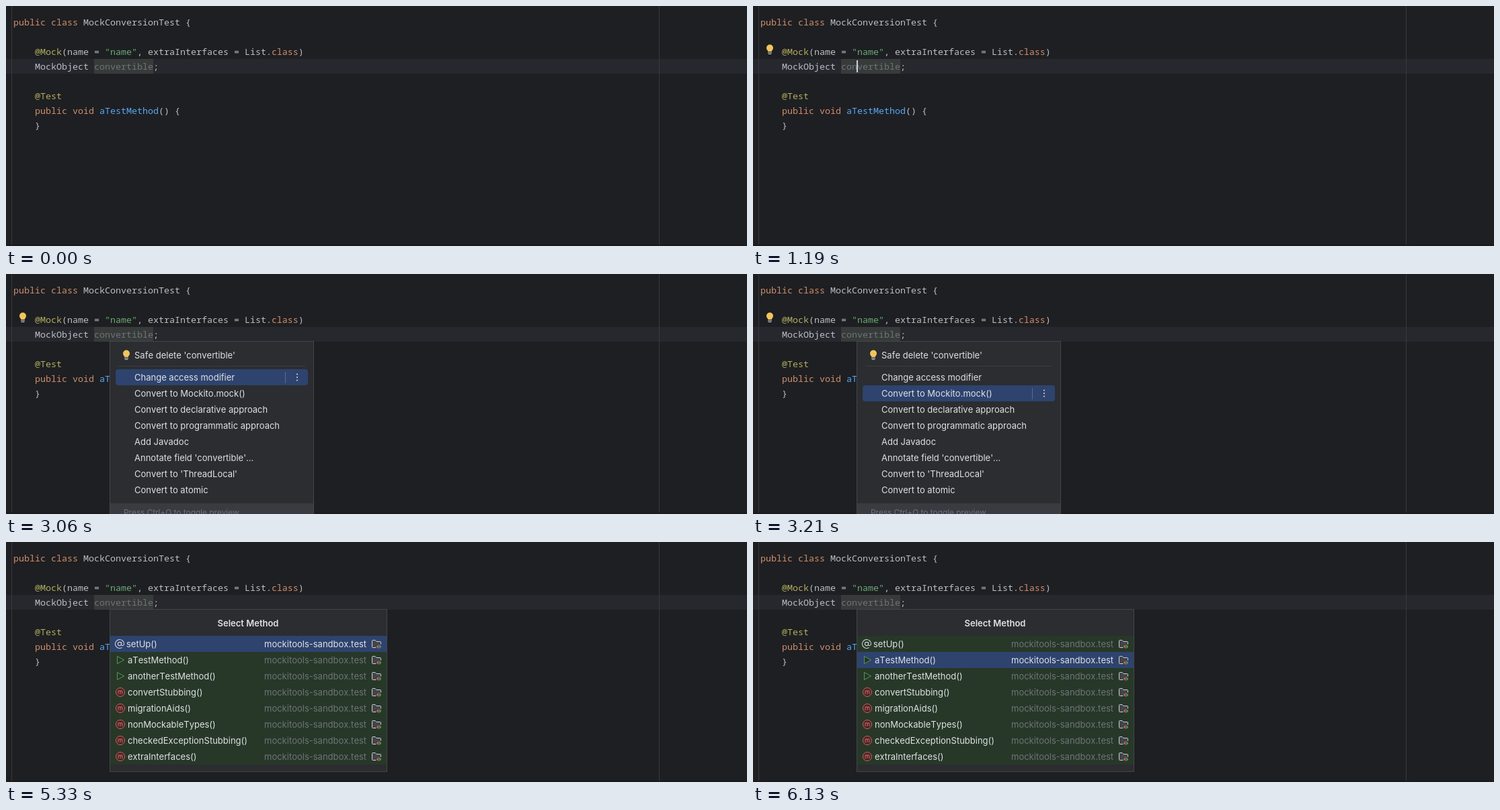
These frames come from a looping animation (1102x358 px, 8000 ms). An HTML page:

```html
<!DOCTYPE html>
<html lang="en">
<head>
<meta charset="utf-8">
<title>Quick fix popup</title>
<style>
  html, body { margin: 0; width: 100%; height: 100%; overflow: hidden; background: #1e1f22; }
  svg { display: block; width: 1102px; height: 358px; }
  text { white-space: pre; }
  .code { font: 13.333px "Noto Sans Mono", monospace; fill: #bcbec4; }
  .ui { font: 13px Inter, sans-serif; font-kerning: none; font-variant-ligatures: none; fill: #dfe1e5; }
  .title { font-weight: 600; text-anchor: middle; }
  .foot { font-size: 12px; letter-spacing: -.1px; }
  .kw { fill: #cf8e6d; }
  .ann { fill: #b3ae60; }
  .str { fill: #6aab73; }
  .fn { fill: #56a8f5; }
  .dim { fill: #6f737a; }
</style>
</head>
<body>
<svg id="stage" viewBox="0 0 1102 358">
  <defs>
    <g id="bulb">
      <path d="M0-6.500a5 5 0 0 1 5 5c0 1.900-1 3.200-2.100 4.200V4h-5.800V2.700C-4 1.700-5 .4-5-1.500a5 5 0 0 1 5-5z" fill="#f2c55c"/>
      <path d="M-2.900 5.500H2.900M-2.400 7.500H2.400" stroke="#ced0d6"/>
    </g>
    <g id="at" fill="none" stroke="#ced0d6" stroke-width="1.100">
      <circle r="2.600"/>
      <path d="M2.600-2.800V1c0 2.200 3.900 2.200 3.900-1A6.500 6.500 0 1 0 3.600 5.400"/>
    </g>
    <path id="run" d="M-4.500-5.500L5.500 0L-4.500 5.500z" fill="#253627" stroke="#57965c" stroke-linejoin="round"/>
    <g id="method">
      <circle r="6.500" fill="#402929" stroke="#db5c5c"/>
      <path d="M-3 3V-2.300M-3-.6C-3-2.700 0-2.700 0-.6V3M0-.6C0-2.700 3-2.700 3-.6V3" fill="none" stroke="#db5c5c" stroke-width="1.100"/>
    </g>
    <g id="folder">
      <path d="M-.5 5.500H-5.500a1 1 0 0 1-1-1V-4.500a1 1 0 0 1 1-1H-2L0-3.500H5.500a1 1 0 0 1 1 1V.5" fill="#43454a" stroke="#ced0d6"/>
      <path d="M3.200 1V7.200L0 4.100z" fill="#db5c5c"/>
      <path d="M4.200 1V7.200L7.400 4.100z" fill="#57965c"/>
    </g>
  </defs>

  <rect width="1102" height="358" fill="#1e1f22"/>
  <rect y="79" width="1102" height="22" fill="#26282e"/>
  <rect x="131" y="79" width="88" height="22" fill="#373b39"/>
  <path d="M8.500 0V356M971.500 0V356" stroke="#36383c"/>
  <rect y="356" width="1102" height="2" fill="#1a1a1d"/>
  <g class="code">
    <text x="11" y="29"><tspan class="kw">public class</tspan> MockConversionTest {</text>
    <text x="43" y="73"><tspan class="ann">@Mock</tspan>(name = <tspan class="str">"name"</tspan>, extraInterfaces = List.<tspan class="kw">class</tspan>)</text>
    <text x="43" y="95">MockObject <tspan class="dim">convertible</tspan>;</text>
    <text x="43" y="139" class="ann">@Test</text>
    <text x="43" y="161"><tspan class="kw">public void</tspan> <tspan class="fn">aTestMethod</tspan>() {</text>
    <text x="43" y="183">}</text>
  </g>
  <rect id="caret" x="154" y="81" width="2" height="18" fill="#ced0d6"/>
  <use id="hint" href="#bulb" x="25" y="64"/>

  <g id="actions" class="ui">
    <rect x="154.500" y="100.500" width="303" height="270" fill="#2b2d30" stroke="#43454a"/>
    <rect x="155" y="342" width="302" height="16" fill="#393b40"/>
    <path d="M167 137.500H445" stroke="#3b3d42"/>
    <g id="pick">
      <rect x="163" width="286" height="24" rx="4" fill="#2e436e"/>
      <path d="M415.500 4V21" stroke="#5a6b90"/>
      <g fill="#ced0d6">
        <circle cx="433" cy="7.500" r="1.100"/>
        <circle cx="433" cy="12" r="1.100"/>
        <circle cx="433" cy="16.500" r="1.100"/>
      </g>
    </g>
    <use href="#bulb" x="179" y="120"/>
    <text x="175" y="360" class="dim foot">Press Ctrl+Q to toggle preview</text>
  </g>

  <g id="methods" class="ui">
    <rect x="154.500" y="100.500" width="412" height="242" fill="#2b2d30" stroke="#43454a"/>
    <text x="360" y="126" class="title">Select Method</text>
    <rect x="155" y="140" width="411" height="192" fill="#273828"/>
    <rect id="row" x="155" width="411" height="24" fill="#2e436e"/>
  </g>
</svg>
<script>
const LOOP = 8000;
const $ = id => document.getElementById(id);

function add(parent, tag, attrs, text = "") {
  const el = document.createElementNS("http://www.w3.org/2000/svg", tag);
  for (const key in attrs) el.setAttribute(key, attrs[key]);
  el.textContent = text;
  parent.append(el);
  return el;
}

const actions = [
  "Safe delete 'convertible'", "Change access modifier", "Convert to Mockito.mock()",
  "Convert to declarative approach", "Convert to programmatic approach", "Add Javadoc",
  "Annotate field 'convertible'...", "Convert to 'ThreadLocal'", "Convert to atomic"
];
const actionTop = i => i ? 118 + 24 * i : 109;
actions.forEach((label, i) => add($("actions"), "text", { x: 191, y: actionTop(i) + 17 }, label));

const methods = [
  ["at", "setUp"], ["run", "aTestMethod"], ["run", "anotherTestMethod"],
  ["method", "convertStubbing"], ["method", "migrationAids"], ["method", "nonMockableTypes"],
  ["method", "checkedExceptionStubbing"], ["method", "extraInterfaces"]
];
const modules = methods.map(([icon, name], i) => {
  const y = 152 + 24 * i;
  add($("methods"), "use", { href: "#" + icon, x: icon === "at" ? 169 : 170, y });
  add($("methods"), "text", { x: i ? 181 : 179, y: y + 5 }, name + "()");
  add($("methods"), "use", { href: "#folder", x: 551, y });
  return add($("methods"), "text", { x: 384, y: y + 5 }, "mockitools-sandbox.test");
});

const within = (t, from, to) => t >= from && t < to;
const show = (id, on) => $(id).setAttribute("visibility", on ? "visible" : "hidden");

function draw(t) {
  show("caret", within(t, 200, 720) || within(t, 1190, 1530));
  show("hint", within(t, 460, 1460) || within(t, 1530, 5330));
  show("actions", within(t, 1530, 5260));
  show("methods", t >= 5330);

  const action = t < 3060 ? 0 : t < 3210 ? 1 : 2;
  $("pick").setAttribute("transform", `translate(0 ${actionTop(action)})`);

  const method = t < 6130 ? 0 : 1;
  $("row").setAttribute("y", 140 + 24 * method);
  modules.forEach((el, i) => el.setAttribute("fill", i === method ? "#dfe1e5" : "#6f737a"));
}

function tick() {
  draw(performance.now() % LOOP);
  requestAnimationFrame(tick);
}
draw(0);
requestAnimationFrame(tick);
</script>
</body>
</html>
```
